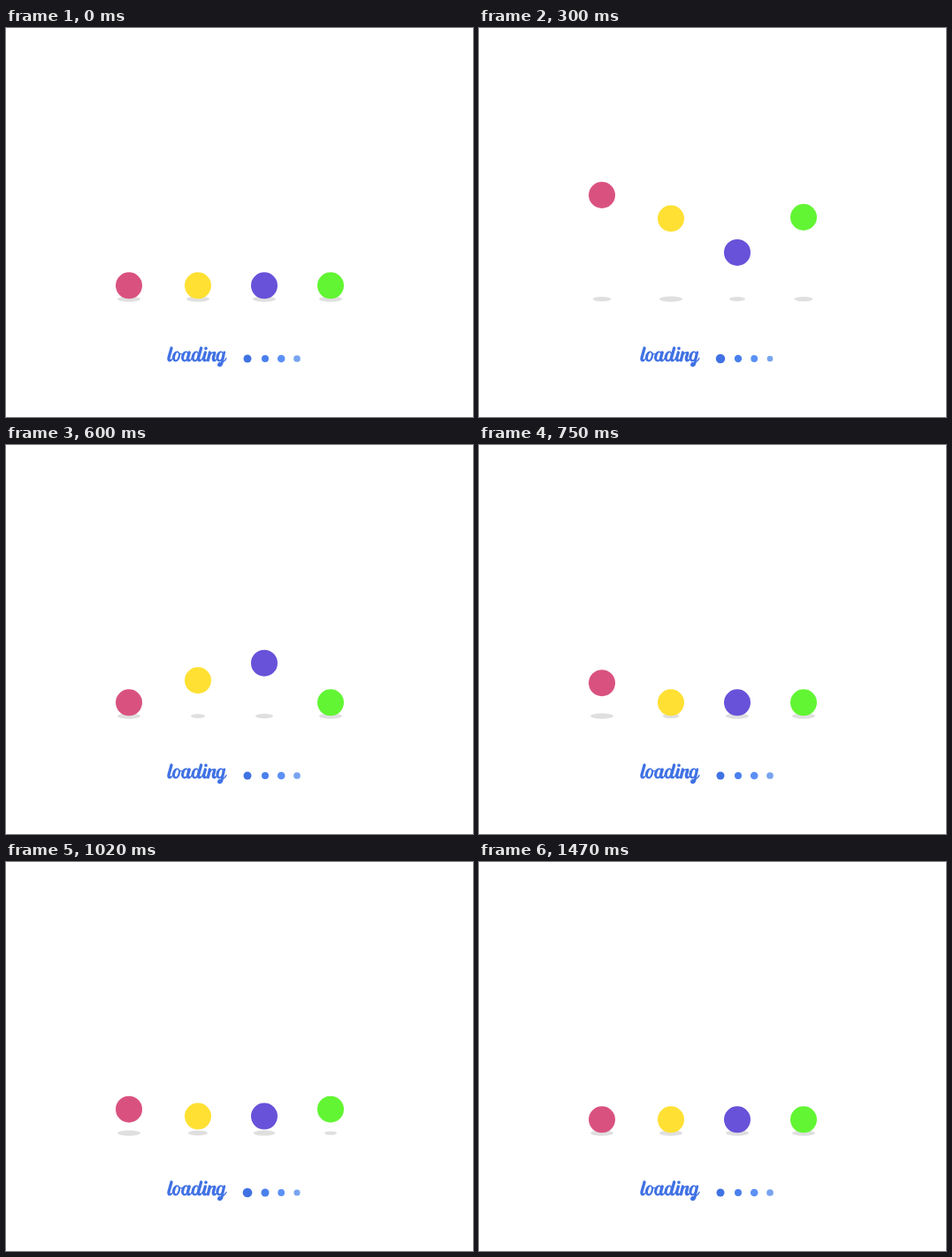
An HTML page with a canvas for the animation above (1500 ms loop, 528 px wide and 440 px high).

```html
<!DOCTYPE html>
<html lang="en">
<head>
<meta charset="utf-8">
<title>loading</title>
<style>
  html, body { margin: 0; width: 100%; height: 100%; overflow: hidden; background: #fff; }
  canvas { display: block; }
</style>
</head>
<body>
<canvas id="stage" width="528" height="440" role="img" aria-label="loading"></canvas>
<script>
const ctx = document.getElementById('stage').getContext('2d');
const LOOP = 1500, STEP = 30, BOUNCE = 300;
const GROUND = 291.3, SHADOW_WIDTH = 26, SLANT = 0.28;
const INK = '#4172e4', SHADOW = '#dfdfdf';

// leap and dips: [start, peak, end, amount]
const balls = [
  { x: 139, color: '#d9527f', leap: [0, 300, 600, 102.3], bounceFrom: 600,
    dips: [[0, 300, 450, 5]] },
  { x: 217, color: '#ffe033', leap: [0, 300, 450, 75.8], bounceFrom: 450,
    dips: [[300, 450, 1260, 12]] },
  { x: 292, color: '#6752d9', leap: [192, 450, 750, 89.3], bounceFrom: 750,
    dips: [[0, 450, 750, 12], [950, 1260, 1470, 6]] },
  { x: 367, color: '#62f533', leap: [0, 300, 450, 77.3], bounceFrom: 900,
    dips: [[0, 300, 450, 5], [750, 1020, 1470, 12]] }
];

// Each dot changes size twice per loop: early and late.
const dots = [
  { x: 273, color: '#4172e4', size: 9, early: 1.5, late: 3.3 },
  { x: 293, color: '#4a80ee', size: 8, early: 0.4, late: 2 },
  { x: 311.2, color: '#5c90f7', size: 8.6, early: -0.8, late: -1.6 },
  { x: 329, color: '#78a4ef', size: 7.7, early: -1, late: -1.1 }
];

// Straight rise to a peak and straight fall back to zero.
function pulse(time, start, peak, end, amount) {
  const share = time < peak ? (time - start) / (peak - start) : (end - time) / (end - peak);
  return amount * Math.max(0, share);
}

// Equal bounces whose height fades out with time.
function rebound(time, from) {
  if (time < from) return 0;
  const start = from + Math.floor((time - from) / BOUNCE) * BOUNCE;
  const peak = start + BOUNCE / 2;
  const height = 0.96 * Math.sqrt(Math.max(0, 1280 - peak));
  return pulse(time, start, peak, start + BOUNCE, height);
}

function oval(x, y, rx, ry, color) {
  ctx.fillStyle = color;
  ctx.beginPath();
  ctx.ellipse(x, y, rx, ry, 0, 0, Math.PI * 2);
  ctx.fill();
}

function stroke(width, path) {
  ctx.lineWidth = width;
  ctx.stroke(new Path2D(path));
}

// Heavy slanted stem with a fine upward exit.
function stem(x, top) {
  stroke(3.3, `M${x + (373 - top) * SLANT} ${top} L${x} 373 q-.5 2.9 1.4 2.8`);
  stroke(1.3, `M${x + 1.4} 376.3 q2.4 -.5 3.6 -3.6`);
}

// Slanted ring, heavier on its left side.
function bowl(x) {
  ctx.fillStyle = INK;
  ctx.beginPath();
  ctx.ellipse(x, 371.4, 4.4, 6.1, SLANT, 0, Math.PI * 2);
  ctx.closePath();
  ctx.moveTo(x + 2, 371);
  ctx.ellipse(x + 0.5, 371.2, 1.6, 4.2, SLANT, 0, Math.PI * 2);
  ctx.fill('evenodd');
}

function drawLettering() {
  ctx.strokeStyle = INK;
  ctx.lineCap = ctx.lineJoin = 'round';
  stem(184, 362);                                       // l
  bowl(192.5);                                          // o
  stroke(1.3, 'M195.6 367.6 q1.4 1.9 3.8 .9');
  bowl(202.6);                                          // a
  stem(205.6, 367);
  bowl(214.2);                                          // d
  stem(217.6, 362);
  stem(223.7, 367);                                     // i
  oval(226, 362.4, 1.8, 1.8, INK);
  stroke(3.3, 'M230.4 367 L228.4 375.8');               // n
  stroke(1.6, 'M229.4 371.5 q3 -5.3 5.8 -4.3');
  stem(234.4, 367.6);
  bowl(242);                                            // g
  stroke(2.8, 'M246.8 366.8 L244.2 378.8 q-.8 3.2 -3 3 q-1.8 -.8 .2 -2.4');
  stroke(1.3, 'M241.4 379.4 l4.6 -2.2 q2.4 -1.4 3 -3.7');
}

function drawBall({ x, color, leap, bounceFrom, dips }, time) {
  const width = dips.reduce((w, dip) => w - pulse(time, ...dip), SHADOW_WIDTH);
  oval(x, 306.6, width / 2, 1.1 + width * 0.077, SHADOW);
  oval(x, GROUND - pulse(time, ...leap) - rebound(time, bounceFrom), 15, 15, color);
}

function drawDot({ x, color, size, early, late }, time) {
  const r = (size + pulse(time, 0, 300, 450, early) + pulse(time, 750, 1260, 1470, late)) / 2;
  oval(x, 374, r, r, color);
}

function draw(time) {
  ctx.fillStyle = '#fff';
  ctx.fillRect(0, 0, 528, 440);
  balls.forEach(ball => drawBall(ball, time));
  drawLettering();
  dots.forEach(dot => drawDot(dot, time));
}

function tick() {
  draw(Math.floor(performance.now() % LOOP / STEP) * STEP);
  requestAnimationFrame(tick);
}
tick();
</script>
</body>
</html>
```
